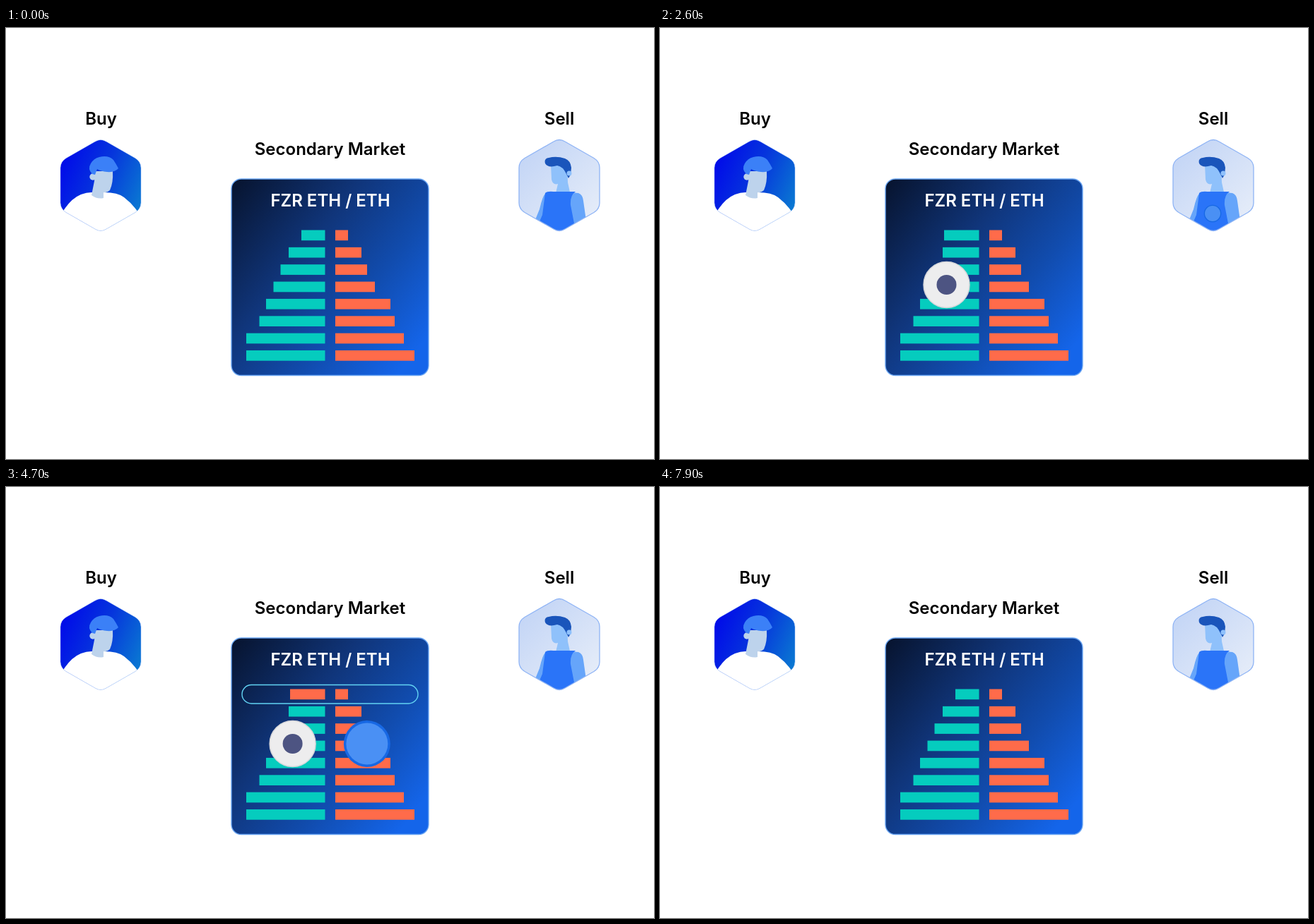
Animation of 917x611 px, one loop 8000 ms. Source, as an HTML page:

```html
<!DOCTYPE html>
<html lang="en">
<head>
<meta charset="utf-8">
<title>Secondary Market</title>
<style>
  html, body { margin: 0; width: 100%; height: 100%; overflow: hidden; background: #fff; }
  svg { display: block; width: 917px; height: 611px; }
  text { font: 600 24px Inter, "Open Sans", sans-serif; text-anchor: middle; }
</style>
</head>
<body>
<svg viewBox="0 0 917 611">
  <defs>
    <linearGradient id="cardFill" x2="1" y2=".8">
      <stop offset="0" stop-color="#07132d"/>
      <stop offset=".4" stop-color="#10357a"/>
      <stop offset=".7" stop-color="#114cae"/>
      <stop offset="1" stop-color="#1465ea"/>
    </linearGradient>
    <linearGradient id="buyFill" y1=".2" x2="1" y2=".7">
      <stop offset="0" stop-color="#0008ea"/>
      <stop offset=".5" stop-color="#0636dc"/>
      <stop offset="1" stop-color="#0a78d2"/>
    </linearGradient>
    <linearGradient id="sellFill" x2=".8" y2="1">
      <stop offset="0" stop-color="#bfd2f5"/>
      <stop offset="1" stop-color="#e6edf9"/>
    </linearGradient>
    <path id="hex" d="M-8-62Q0-67 8-62L49-38.500Q57-33.500 57-25V25Q57 33.500 49 38.500L8 62Q0 67-8 62L-49 38.500Q-57 33.500-57 25V-25Q-57-33.500-49-38.500Z"/>
    <clipPath id="hexClip"><use href="#hex"/></clipPath>
  </defs>

  <text x="134.500" y="137">Buy</text>
  <text x="783" y="137">Sell</text>
  <text x="458.500" y="180">Secondary Market</text>

  <g transform="translate(134 223)">
    <g clip-path="url(#hexClip)">
      <use href="#hex" fill="url(#buyFill)"/>
      <path fill="#fff" d="M-58 45Q-45 20-28 13Q-20 10-13 10L5 10Q24 10 33 17Q46 27 54 40L60 70H-60Z"/>
      <path fill="#bdd3ec" d="M-8-20L17-20Q18-4 13 7Q9 11 4 10L4 18Q-5 20-13 14L-9-6Z"/>
      <circle cx="-11" cy="-12" r="4.700" fill="#bdd3ec"/>
      <path fill="#3b80f7" d="M-12-16Q-19-23-14-31Q-10-38-2-40Q11-43 18-36Q22-30 25-24Q20-18 9-19Q0-20-5-23L-8-15Z"/>
    </g>
    <use href="#hex" fill="none" stroke="#8fb4f5" stroke-opacity=".45"/>
  </g>

  <g transform="translate(783 223)">
    <g clip-path="url(#hexClip)">
      <use href="#hex" fill="url(#sellFill)"/>
      <path fill="#66a5fa" d="M-20 12Q-24 16-28 34L-37 56L-15 66L-8 20ZM14 10L27 11Q33 13 34 22L38 50L18 66Z"/>
      <path fill="#8fc1fb" d="M-12-30L11-28L12-4L16 14Q4 20-5 11L-2-2Q-9 0-11-8Z"/>
      <path fill="#1a55bb" d="M-20-31Q-22-38-15-39Q-4-42 8-38Q16-35 17-25L16-15L13-10L10-16Q5-27-3-28Q-16-24-20-31Z"/>
      <circle cx="14" cy="-17" r="3.500" fill="#8fc1fb"/>
      <path fill="#2a74f8" d="M-20 11Q-17 8-8 9L23 9Q15 14 16 28L21 54L24 70H-36L-24 42Z"/>
    </g>
    <use href="#hex" fill="none" stroke="#8fb4f5" stroke-width="1.300"/>
  </g>

  <rect x="319" y="214" width="279" height="278.500" rx="14" fill="url(#cardFill)" stroke="#6aa5f2" stroke-width="1.400"/>
  <text x="459" y="253" fill="#fff">FZR ETH / ETH</text>
  <g id="bars"></g>
  <rect id="ring" x="334" y="280.500" width="249" height="26.500" rx="13.250" fill="none" stroke="#62d3f3" stroke-width="1.400"/>

  <g id="ethCoin">
    <circle r="32.500" fill="#ededee" stroke="#d6d6da" stroke-width="1.500"/>
    <circle r="14" fill="#4d5482"/>
  </g>
  <g id="tokenCoin">
    <circle r="33" fill="#1768e4"/>
    <circle r="29.500" fill="#4a90f4"/>
  </g>
</svg>
<script>
const LOOP = 8000, STEP = 100;
const TEAL = [5, 204, 190], ORANGE = [255, 107, 74];
const buyWidths = [33.5, 51.5, 63, 73, 83.5, 93, 111.5, 111.5];
const sellWidths = [18, 37, 45, 56, 78, 84, 97, 112];
const find = id => document.getElementById(id);
const mix = (a, b, k) => a + (b - a) * k;
const rgb = c => `rgb(${c.map(Math.round)})`;

function addBar(x, row, width, color) {
  const bar = document.createElementNS("http://www.w3.org/2000/svg", "rect");
  const attrs = { x, y: 286.5 + row * 24.36, width, height: 14.7, fill: rgb(color) };
  for (const name in attrs) bar.setAttribute(name, attrs[name]);
  return find("bars").appendChild(bar);
}
const buyBars = buyWidths.map((w, i) => addBar(451.5 - w, i, w, TEAL));
sellWidths.forEach((w, i) => addBar(466, i, w, ORANGE));

// Cubic ease-in-out from 0 to 1
function ease(t, start, length) {
  const p = Math.min(1, Math.max(0, (t - start) / length));
  return p < 0.5 ? 4 * p ** 3 : 1 - 4 * (1 - p) ** 3;
}

// trip: 0 at a person, 1 in the market; side: 0 buyer, 1 seller
function placeCoin(id, trip, side, opacity) {
  const x = mix(mix(134, 782, side), mix(405.5, 511, side), trip);
  const y = mix(364, 263, (1 - trip) ** 1.57);
  const size = mix(12.3, 33, trip) / 33;
  find(id).setAttribute("transform", `translate(${x} ${y}) scale(${size})`);
  find(id).setAttribute("opacity", opacity);
}

function draw(t) {
  const swap = ease(t, 4650, 750);
  const home = ease(t, 5780, 900);
  const shown = ease(t, 50, 550) - ease(t, 7350, 550);
  placeCoin("ethCoin", ease(t, 850, 900) - home, swap, shown);
  placeCoin("tokenCoin", ease(t, 2635, 900) - home, 1 - swap, shown);

  const width = buyWidths[0] + 16 * (ease(t, 1750, 900) - swap);
  const matched = ease(t, 3750, 600) - swap;
  buyBars[0].setAttribute("x", 451.5 - width);
  buyBars[0].setAttribute("width", width);
  buyBars[0].setAttribute("fill", rgb(TEAL.map((c, i) => mix(c, ORANGE[i], matched))));
  find("ring").setAttribute("opacity", ease(t, 3750, 600) - ease(t, 5750, 600));
}

// The motion advances at ten pictures a second
const begin = performance.now();
function tick() {
  const t = (performance.now() - begin) % LOOP;
  draw(Math.floor(t / STEP) * STEP);
  requestAnimationFrame(tick);
}
tick();
</script>
</body>
</html>
```
